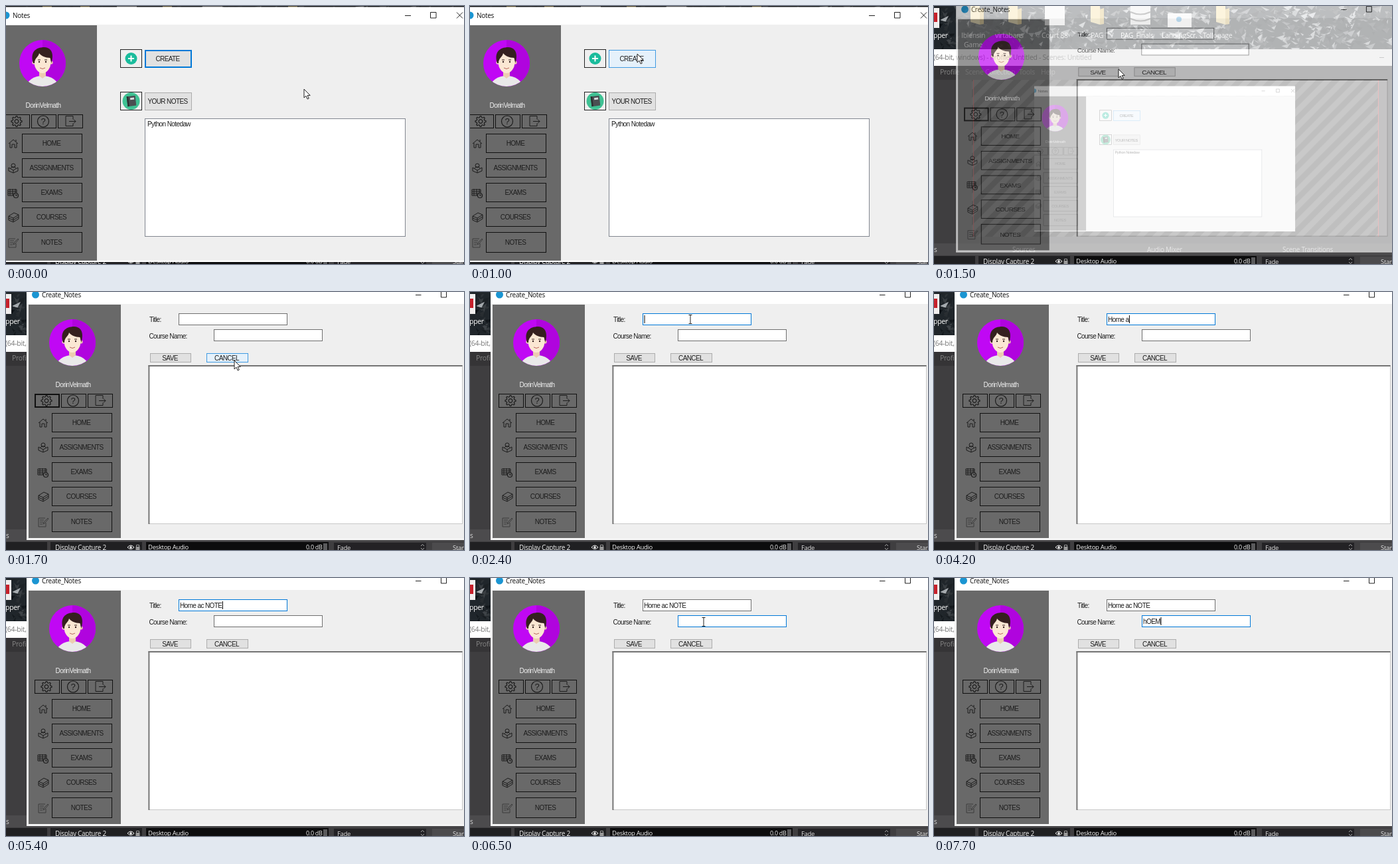
An HTML page with a canvas that plays this animation: 690x388 px, repeating every 8 s.

```html
<!DOCTYPE html>
<html lang="en">
<head>
<meta charset="utf-8">
<title>Notes</title>
<style>
html, body { margin: 0; width: 100%; height: 100%; overflow: hidden; background: #333; }
canvas { display: block; width: 690px; height: 388px; }
</style>
</head>
<body>
<canvas id="stage" width="690" height="388"></canvas>
<script>
const W = 690, H = 388, LOOP = 8000, STEP = 100;
const UI = '"Liberation Sans", Arial, sans-serif';
const SYS = '"Open Sans", "Noto Sans", sans-serif';
const BLUE = '#0078d7', INK = '#1c1c1c', TAU = Math.PI * 2;
const USER = 'DorinVelmath';
const stage = document.getElementById('stage').getContext('2d');
let c = stage;

function rect(x, y, w, h, fill) {
  c.fillStyle = fill;
  c.fillRect(x, y, w, h);
}

function box(x, y, w, h, fill, border, line = 1) {
  if (fill) rect(x, y, w, h, fill);
  c.strokeStyle = border;
  c.lineWidth = line;
  c.strokeRect(x + line / 2, y + line / 2, w - line, h - line);
}

function disc(x, y, r, fill) {
  c.fillStyle = fill;
  c.beginPath();
  c.arc(x, y, r, 0, TAU);
  c.fill();
}

function poly(points, fill) {
  c.fillStyle = fill;
  c.beginPath();
  points.forEach(([x, y]) => c.lineTo(x, y));
  c.closePath();
  c.fill();
}

function stroke(d, color = INK, width = 1) {
  c.strokeStyle = color;
  c.lineWidth = width;
  c.stroke(new Path2D(d));
}

// y is the middle of the capitals
function text(s, x, y, { size = 10, font = UI, color = '#1d1d1d', align = 'left', gap = -0.6 } = {}) {
  c.font = `${size}px ${font}`;
  c.letterSpacing = gap + 'px';
  c.textAlign = align;
  c.fillStyle = color;
  c.fillText(s, x, y + size * 0.36);
  return c.measureText(s).width;
}

const sysText = (s, x, y, color, size = 10) =>
  text(s, x, y, { size, font: SYS, color, gap: -0.3 });

function at(x, y, draw) {
  c.save();
  c.translate(x, y);
  draw();
  c.restore();
}

function button(label, x, y, w, h, state) {
  const border = { hover: '#3f9ae2', focus: BLUE }[state] || '#adadad';
  box(x, y, w, h, state === 'hover' ? '#e5f1fb' : '#e1e1e1', border, state === 'focus' ? 2 : 1);
  text(label, x + w / 2 - 1, y + h / 2 + 0.3, { align: 'center' });
}

function seeded(seed) {
  return () => (seed = (seed * 16807) % 2147483647) / 2147483647;
}

// ---- sidebar ----
function avatar() {
  c.save();
  c.beginPath();
  c.arc(0, 0, 35, 0, TAU);
  c.clip();
  rect(-35, -35, 70, 70, '#c008f4');
  rect(0, -35, 35, 70, '#b004de');
  c.fillStyle = '#e9e9e9';
  c.beginPath();
  c.ellipse(0, 36, 24, 17, 0, 0, TAU);
  c.fill();
  poly([[-5, 8], [5, 8], [5, 19], [0, 23], [-5, 19]], '#eccdb0');
  disc(-13, -1, 2.6, '#f6dcc2');
  disc(13, -1, 2.6, '#ecccae');
  c.fillStyle = '#fbe7d3';
  c.beginPath();
  c.ellipse(0, -2, 12.5, 17, 0, 0, TAU);
  c.fill();
  c.fillStyle = '#35201f';
  c.fill(new Path2D('M-14 0C-19-16-11-24 3-24C15-23 17-13 13.5 0L11.5-8C4-8-2-11-5-15C-6-9-12-8-12 0Z'));
  disc(-5, -2, 1.2, '#35201f');
  disc(5, -2, 1.2, '#35201f');
  stroke('M-7-5H-3M3-5H7', '#35201f');
  stroke('M-4 7Q0 10 4 7', '#b8685c');
  c.restore();
}

function gear() {
  c.beginPath();
  for (let i = 0; i < 32; i++) {
    const a = (i - 0.5) / 32 * TAU, r = i % 4 < 2 ? 8 : 6;
    c.lineTo(Math.cos(a) * r, Math.sin(a) * r);
  }
  c.closePath();
  c.strokeStyle = INK;
  c.lineWidth = 1.2;
  c.stroke();
  c.beginPath();
  c.arc(0, 0, 2.8, 0, TAU);
  c.stroke();
}

function help() {
  c.strokeStyle = INK;
  c.lineWidth = 1.2;
  c.beginPath();
  c.arc(0, 0, 8.5, 0, TAU);
  c.stroke();
  text('?', 0, 0.3, { size: 13, align: 'center', gap: 0 });
}

const door = () => stroke('M4-3V-8H-7V7H4V3M-2 0H8M5-3L8 0L5 3');

const navItems = [
  ['HOME', 182, 29, () => stroke('M-7 0L0-6L7 0M-5-1V6H-2V1H2V6H5V-1M4-3V-6')],
  ['ASSIGNMENTS', 219, 29, () => {
    stroke('M-3-4A3 3 0 1 0 3-4A3 3 0 1 0-3-4M0 7L-7 4V-1L0 3L7-1V4ZM0 3V7M-4 0L-2-2H2L4 0');
  }],
  ['EXAMS', 256, 29, () => {
    stroke('M-8-5H5V4H-8ZM-8-2H5M-8 1H3M-5-6V4M-1-6V4M3-6V1');
    disc(4, 4, 3.6, '#696969');
    stroke('M.5 4A3.5 3.5 0 1 0 7.5 4A3.5 3.5 0 1 0 .5 4M4 2V4H6', INK, 1.2);
  }],
  ['COURSES', 293, 29, () => {
    stroke('M-7-2L1-7L8-4L0 1ZM-7-2V1L0 4L8-1V-4M-7 1V4L0 7L8 2V-1M0 1V7');
  }],
  ['NOTES', 330, 31, () => {
    stroke('M3-6H-7V7H4V1M-5-3H1M-5 0H0M-5 3H-1', '#3c3c3c');
    stroke('M0 3L1 0L7-6L8-5L2 2Z', '#3c3c3c');
  }]
];

function sidebar(width, height, gearFocus) {
  rect(34, 19, width, height, '#696969');
  at(100, 76, avatar);
  text(USER, 101, 139, { color: '#f0f0f0', align: 'center' });
  [[43, gear, 61], [83, help, 101], [123, door, 142]].forEach(([x, icon, mid], i) => {
    box(x, 153, 38, 21, null, '#111', gearFocus && !i ? 2 : 1);
    at(mid, 163.5, icon);
  });
  for (const [label, y, h, icon] of navItems) {
    box(69, y, 91, h, null, '#111');
    text(label, 113.5, y + h / 2 + 0.3, { align: 'center' });
    at(56, y + h / 2 + 0.5, icon);
  }
}

// ---- windows ----
function notesWindow(createState) {
  rect(0, 1.5, W, 27, '#fff');
  rect(0, 28, W, 356, '#efefef');
  rect(0, 383, W, 2, '#fff');
  disc(0, 14, 5.5, '#1b95d2');
  sysText('Notes', 10, 14.5, '#111');
  stroke('M601 14.5H610M639.5 9.5H648V18H639.5ZM679 9.5L688 18.5M688 9.5L679 18.5', '#222');
  at(-45, 10, () => sidebar(148, 354, false));

  box(172, 65, 33, 28, null, '#222');
  disc(188.5, 79, 9, '#1abc9c');
  stroke('M184 79H193M188.5 74.5V83.5', '#fff', 2);
  button('CREATE', 209, 66, 71, 27, createState);

  box(172, 129, 33, 28, null, '#222');
  disc(188.5, 143, 13, '#3fc193');
  at(188.5, 143, () => {
    c.rotate(-0.12);
    rect(-6, -7.5, 13, 15, '#4a4f52');
    rect(-6, -7.5, 2.5, 15, '#2c3032');
    rect(-1, -5, 6, 3, '#d9dee0');
  });
  button('YOUR NOTES', 209, 130, 71, 27);

  box(209, 169, 393, 178, '#fff', '#828790');
  text('Python Notedaw', 213, 177);
}

function field(x, y, value, focused, caret) {
  box(x, y, 164, 18, '#fff', focused ? BLUE : '#6f6f6f');
  const w = text(value, x + 2, y + 9);
  if (focused && caret) rect(x + 2.5 + w, y + 3, 1, 12, '#000');
}

function createWindow({ title, course, focus, caret, cancelHover }) {
  rect(31, -10, 700, 28, '#fff');
  rect(31, 18, 700, 355, '#efefef');
  rect(31, 371, 700, 2, '#fafafa');
  disc(44.5, 4, 5.5, '#1b95d2');
  sysText('Create_Notes', 54, 4.5, '#111');
  stroke('M617 4.5H625.5M655.5-.5H663.5V8H655.5Z', '#222');
  sidebar(139, 351, focus === 'gear');
  text('Title:', 216, 41.5);
  text('Course Name:', 215.5, 66);
  field(260, 32, title, focus === 'title', caret);
  field(313, 56, course, focus === 'course', caret);
  button('SAVE', 217, 92, 62, 14);
  button('CANCEL', 302, 92, 63, 14, cancelHover && 'hover');
  rect(214.5, 110, 473.5, 239, '#c9c9c9');
  rect(214.5, 110, 473, 2, '#737373');
  rect(214.5, 110, 2, 239, '#737373');
  rect(216.5, 112, 470.5, 236, '#fff');
}

// ---- desktop behind the windows ----
function rocks() {
  const rnd = seeded(77);
  rect(0, 0, W, 66, '#20262b');
  for (let i = 0; i < 1100; i++) {
    const x = rnd() * W, y = rnd() * 66, l = 3 + rnd() * 12, k = rnd();
    const bright = x > 120 ? 0.6 : 0.93;
    const v = k > bright ? 80 + rnd() * 110 : 14 + rnd() * 50;
    poly([[x, y], [x + l, y + rnd() * 14 - 7], [x + l * 0.6, y + 2 + rnd() * 5]],
      `rgb(${v},${v + 5},${v + 9})`);
  }
}

function desktopIcons() {
  for (const x of [55, 112, 236, 425]) {
    poly([[x, -4], [x + 14, 0], [x + 14, 28], [x, 24]], '#f5dc93');
    poly([[x + 14, 5], [x + 20, 3], [x + 20, 27], [x + 14, 28]], '#d9b75e');
  }
  rect(167, 0, 30, 29, '#f4f4f4');
  rect(296, 0, 30, 28, '#e8e8e8');
  stroke('M296 9Q311 16 326 9M296 19Q311 26 326 19', '#555', 2);
  rect(352, 11, 36, 21, '#f4f4f4');
  disc(369, 20, 4, '#2a8fd0');
  rect(0, 3, 8, 30, '#f1eeee');
  rect(0, 10, 5, 14, '#c6202b');
  const labels = [['pper', -1], ['Iblensin', 41], ['virtabans', 92], ['Court 88', 162],
    ['PAG', 236], ['PAG_Finals', 281], ['LandingScr.', 343], ['Tollopage', 405]];
  labels.forEach(([s, x]) => sysText(s, x, 44, '#fff', 10.5));
  sysText('Game', 45, 58, '#fff', 10.5);
}

function preview() {
  c.save();
  c.beginPath();
  c.rect(57, 111, 613, 236);
  c.clip();
  rect(57, 111, 613, 236, '#282828');
  for (let x = -200; x < 720; x += 24) {
    poly([[x, 347], [x + 12, 347], [x + 248, 111], [x + 236, 111]], '#4c4c4c');
  }
  c.restore();
  stroke('M59.5 111V347M669.5 111V347', '#c0282c');
  c.save();
  c.translate(151, 119.5);
  c.scale(0.57, 0.57);
  c.beginPath();
  c.rect(0, 1.5, W, 383.5);
  c.clip();
  notesWindow('hover');
  c.restore();
}

function desktop() {
  rocks();
  desktopIcons();
  rect(0, 65, W, 25, '#fff');
  sysText('(64-bit, windows) - Profile: Untitled - Scenes: Untitled', -1, 77.5, '#777', 10.5);
  stroke('M671 77.5H678', '#777');
  rect(0, 90, W, 298, '#3f3e40');
  rect(0, 90, W, 21, '#353436');
  [['Profile', 9], ['Scene Collection', 47], ['Tools', 128], ['Help', 161]]
    .forEach(([s, x]) => sysText(s, x, 99, '#858585', 10.5));
  preview();
  rect(0, 357, W, 18, '#4c4b4d');
  [['s', 0], ['Sources', 118], ['Audio Mixer', 321], ['Scene Transitions', 525]]
    .forEach(([s, x]) => sysText(s, x, 366, '#d4d4d4'));
  rect(0, 376, 62, 12, '#202022');
  rect(67, 376, 138, 12, '#202022');
  sysText('Display Capture 2', 74, 384.5, '#eee');
  stroke('M183 384Q188 378 193 384Q188 389 183 384', '#eee');
  disc(188, 384, 1.8, '#eee');
  rect(195.5, 383, 6, 5, '#999');
  stroke('M196.5 383V380.5H200.5V383', '#999');
  rect(211, 376, 275, 12, '#0c0c0d');
  sysText('Desktop Audio', 214, 384, '#f2f2f2', 9.5);
  sysText('0.0 dB', 452, 384, '#f2f2f2', 9);
  rect(478, 378, 6, 10, '#5a5a5c');
  rect(494, 377, 139, 11, '#232225');
  sysText('Fade', 499, 384.5, '#ddd', 9.5);
  stroke('M625 382L627.5 379.5L630 382M625 385L627.5 387.5L630 385', '#aaa');
  rect(642, 377, 48, 11, '#4c4b4d');
  sysText('Start', 673, 384.5, '#ddd', 9.5);
}

const backdrop = document.createElement('canvas');
backdrop.width = W;
backdrop.height = H;
const layer = backdrop.cloneNode();

function paintOn(ctx, draw) {
  const previous = c;
  c = ctx;
  draw();
  c = previous;
}
paintOn(backdrop.getContext('2d'), desktop);

// ---- timeline ----
const titleTimes = [2900, 3100, 3300, 3500, 3700, 4000, 4300, 4600, 4900, 5100, 5200, 5400];
const courseTimes = [7100, 7300, 7500, 7700];
const path = [
  [300, 449, 125], [1000, 252, 72], [1400, 252, 72], [1500, 278, 95], [1600, 312, 100],
  [1700, 344, 103], [2200, 332, 41], [5700, 332, 41], [6300, 352, 66], [8000, 352, 66]
];

const typed = (s, times, t) => s.slice(0, times.filter(k => k <= t).length);

function pointer(t) {
  if (t <= path[0][0]) return path[0].slice(1);
  const i = path.findIndex(k => k[0] >= t);
  const [t0, x0, y0] = path[i - 1], [t1, x1, y1] = path[i];
  const p = (t - t0) / (t1 - t0), e = p * p * (3 - 2 * p);
  return [x0 + (x1 - x0) * e, y0 + (y1 - y0) * e];
}

function drawPointer(x, y, beam) {
  at(x, y, () => {
    if (beam) return stroke('M-2.5-6.5H2.5M0-6.5V6.5M-2.5 6.5H2.5', '#222');
    const arrow = new Path2D('M0 0V13L3 10.2L5.2 15L7.3 14L5.1 9.4H9.2Z');
    c.fillStyle = '#fff';
    c.fill(arrow);
    c.strokeStyle = '#222';
    c.lineWidth = 1;
    c.stroke(arrow);
  });
}

function openingWindow(t, state) {
  const p = Math.min((t - 1500) / 200, 1);
  const shown = 1 - (1 - p) ** 2;
  const scale = 0.99 + 0.01 * shown;
  const ctx = layer.getContext('2d');
  ctx.clearRect(0, 0, W, H);
  paintOn(ctx, () => {
    c.save();
    c.translate(245, 110);
    c.scale(scale, scale);
    c.translate(-245, -110);
    createWindow(state);
    c.restore();
  });
  c.globalAlpha = 0.7 + 0.3 * shown;
  c.drawImage(layer, 0, 0);
  c.globalAlpha = 1;
}

function render(t) {
  const [x, y] = pointer(t);
  c.drawImage(backdrop, 0, 0);
  if (t < 1500) {
    const hover = x > 209 && x < 280 && y > 66 && y < 93;
    rect(0, 0, W, 1.5, 'rgba(10, 10, 10, 0.7)');
    notesWindow(hover ? 'hover' : 'focus');
    drawPointer(x, y);
    return;
  }
  const focus = t < 2300 ? 'gear' : t < 6500 ? 'title' : 'course';
  const typing = (t >= 2900 && t < 5600) || t >= 7100;
  const state = {
    title: typed('Home ac NOTE', titleTimes, t),
    course: typed('hOEM', courseTimes, t),
    focus,
    caret: typing || t % 1000 < 500,
    cancelHover: x > 302 && x < 365 && y > 92 && y < 106
  };
  if (t < 1700) openingWindow(t, state);
  else createWindow(state);
  const hidden = (t >= 2900 && t < 5800) || t >= 7100;
  const overField = (x > 260 && x < 424 && y > 32 && y < 50) || (x > 313 && x < 477 && y > 56 && y < 74);
  if (!hidden) drawPointer(x, y, overField);
}

const start = performance.now();
function tick() {
  const t = (performance.now() - start) % LOOP;
  render(Math.floor(t / STEP) * STEP);
  requestAnimationFrame(tick);
}
tick();
</script>
</body>
</html>
```
